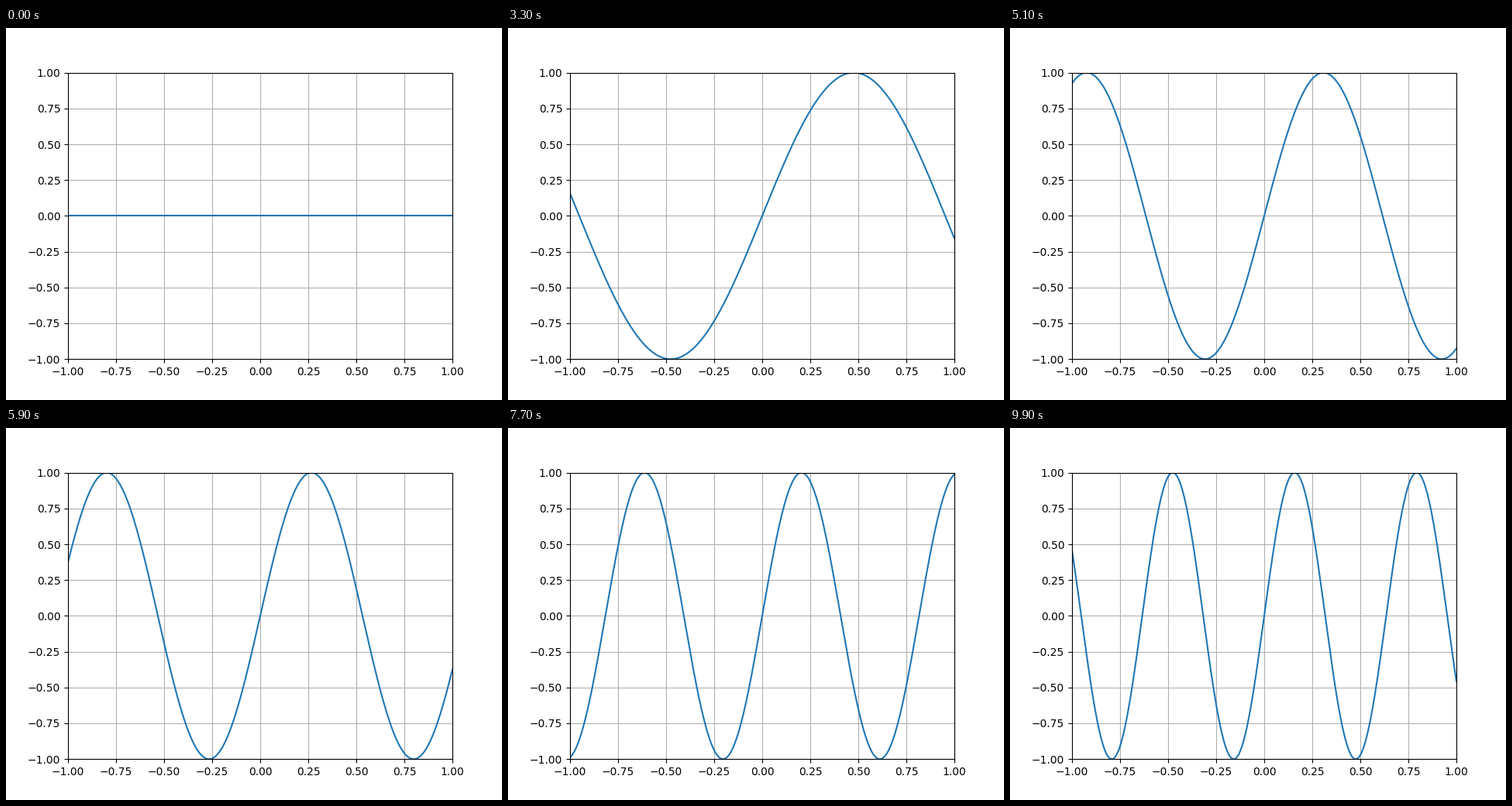
A matplotlib script that plays this animation: 640x480 px, repeating every 10000 ms.

```python
import numpy as np
import matplotlib.pyplot as plt
from matplotlib.animation import FuncAnimation

FRAMES = 100
INTERVAL = 100  # ms
FREQ_STEP = 0.1

fig, ax = plt.subplots(figsize=(6.4, 4.8), dpi=100)
ax.set_xlim(-1, 1)
ax.set_ylim(-1, 1)
ax.grid(True)

x = np.linspace(-1, 1, 401)
line, = ax.plot(x, np.zeros_like(x))


def update(i):
    line.set_ydata(np.sin(FREQ_STEP * i * x))
    return line,


anim = FuncAnimation(fig, update, frames=FRAMES, interval=INTERVAL,
                     repeat=True, repeat_delay=0)
plt.show()
```
